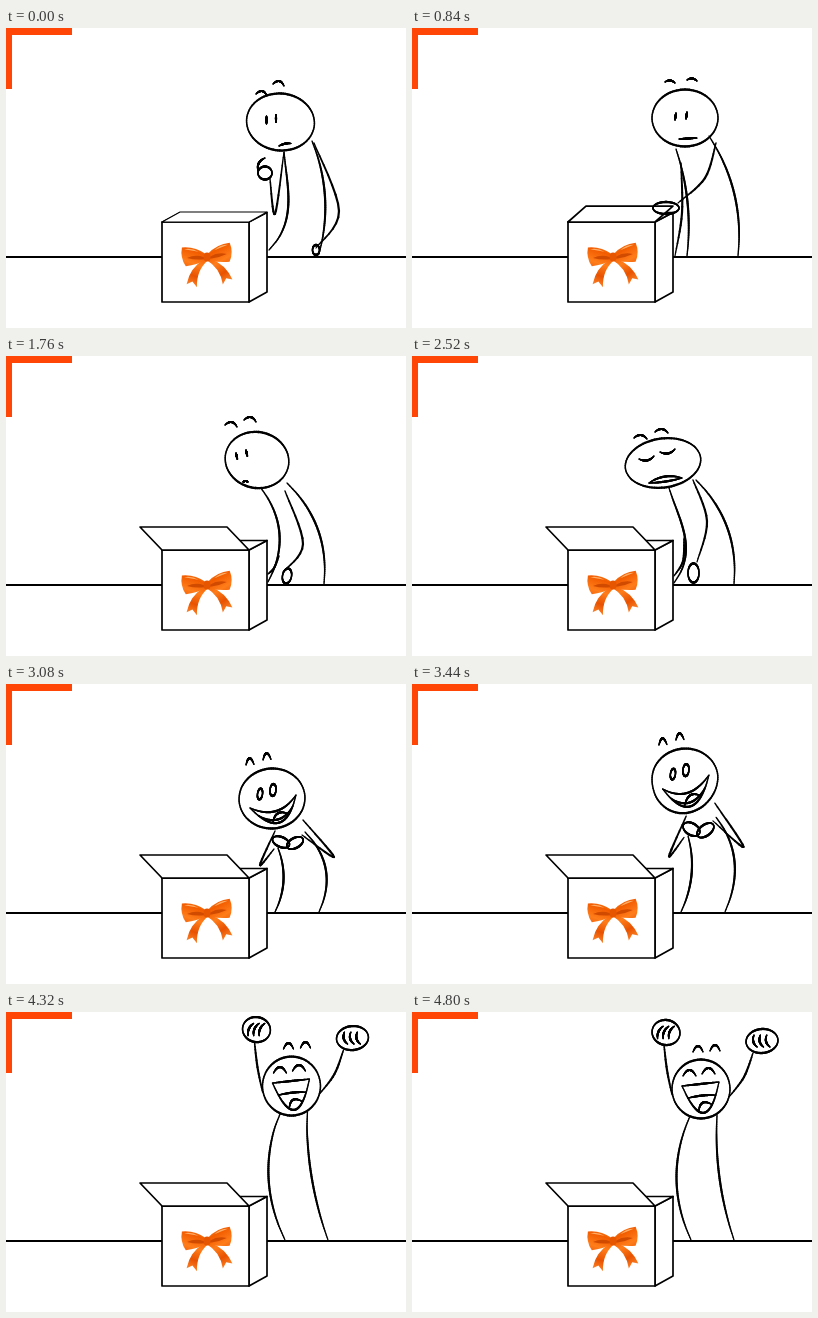
Recreate the animation shown at these times as an HTML page with a canvas. Size 400 by 300 pixels, loop 5.36 s.

```html
<!DOCTYPE html>
<html lang="en">
<head>
<meta charset="utf-8">
<title>Gift box</title>
<style>
  html, body { margin: 0; width: 100%; height: 100%; overflow: hidden; background: #fff; }
  canvas { display: block; width: 400px; height: 300px; }
</style>
</head>
<body>
<canvas id="stage"></canvas>
<script>
const LOOP = 5360, STEP = 40, GROUND = 229;
const { PI, sin, cos, abs, min, max, hypot } = Math;
const canvas = document.getElementById('stage');
const ctx = canvas.getContext('2d');
const dpr = window.devicePixelRatio || 1;
canvas.width = 400 * dpr;
canvas.height = 300 * dpr;

const mix = (a, b, k) => a + (b - a) * k;
const mixPoint = (a, b, k) => [mix(a[0], b[0], k), mix(a[1], b[1], k)];
const steps = n => Array.from({ length: n }, (_, i) => i);

// Stroke builders: each returns a list of strokes
const oval = (cx, cy, rx, ry, tilt = 0) => [{
  closed: true,
  pts: steps(12).map(i => {
    const a = i * PI / 6, x = rx * cos(a), y = ry * sin(a);
    return [cx + x * cos(tilt) - y * sin(tilt), cy + x * sin(tilt) + y * cos(tilt)];
  })
}];

// Line bowed sideways; opposite bends at the two ends give an S
function arc(x0, y0, x1, y1, bend = 0, bendEnd = bend) {
  const dx = x1 - x0, dy = y1 - y0, len = hypot(dx, dy);
  const pts = steps(9).map(i => {
    const u = i / 8, off = 4 * u * (1 - u) * mix(bend, bendEnd, u) / len;
    return [x0 + dx * u - dy * off, y0 + dy * u + dx * off];
  });
  return [{ closed: false, pts }];
}

const limb = (...pts) => [{ closed: false, pts }];
const pair = (x0, y0, x1, y1, dx, dy, bend) =>
  [...arc(x0, y0, x0 + dx, y0 + dy, bend), ...arc(x1, y1, x1 + dx, y1 + dy, bend)];

function grin(x0, y0, x1, y1, lip, jaw, jawEnd = jaw) {
  const chin = arc(x0, y0, x1, y1, jaw, jawEnd);
  const { pts } = chin[0];
  return [...arc(x0, y0, x1, y1, lip), ...arc(...pts[1], ...pts[7], lip - 1),
    ...chin, ...arc(...pts[3], ...pts[6], -6)];
}

const fist = (cx, cy, rx, ry, tilt) => [
  ...oval(cx, cy, rx, ry, tilt),
  ...[-0.4, 0, 0.4].flatMap(k =>
    arc(cx + rx * (k + tilt), cy - ry * 0.5, cx + rx * (k - tilt), cy + ry * 0.5, rx * 0.15))
];

const think = {
  head: oval(274.5, 94, 34, 28.5, 0.1),
  brows: pair(250, 66, 267, 56, 11, 2, -4),
  eyes: pair(260.5, 88, 270, 86.5, 0, 8),
  mouth: arc(273, 118, 285, 115.5, -1),
  front: arc(278, 124, 263, 222, -6, -18),
  back: arc(306, 113, 313, 226, -9.5),
  armL: limb([264, 151], [269, 186], [278, 124]),
  armR: limb([308, 115], [333, 183], [310, 220]),
  handL: [...oval(259, 145, 7, 6.5), ...arc(259, 130, 252, 143, 3)],
  handR: oval(310, 222, 3.5, 5)
};

const reach = {
  head: oval(273, 90, 33, 28.5),
  brows: pair(253, 54, 275, 52, 10, 1, -2),
  eyes: pair(264, 85, 275, 84, -1, 7),
  mouth: arc(267, 111, 285, 110),
  front: arc(264, 121, 275, 228, -6),
  back: arc(297, 108, 326, 228, -11),
  armL: limb([269, 135], [270, 185], [263, 228]),
  armR: limb([304, 115], [293, 150], [266, 175]),
  handR: oval(254, 180, 13, 6)
};

const open = {
  ...reach,
  armR: limb([304, 115], [278, 140], [243, 161]),
  handR: oval(236, 163, 7, 5)
};

const peek = {
  head: oval(251, 104, 32, 28, 0.2),
  brows: pair(219, 69, 238, 64, 12, 2, -4),
  eyes: pair(230, 97, 240, 94, 1.5, 6.5),
  mouth: arc(237, 126, 242, 126, -1),
  front: arc(255, 132, 262, 226, -15),
  back: arc(281, 127, 318, 228, -13),
  armL: limb([273, 200], [268, 212], [262, 218]),
  armR: limb([279, 135], [297, 188], [277, 216]),
  handR: oval(281, 220, 4.5, 7.5, 0.2)
};

const wonder = { ...peek, brows: pair(219, 60, 238, 56, 12, 1, -4) };

const frown = {
  head: oval(251, 107, 38, 24.5, -0.15),
  brows: pair(222, 82, 243, 76, 13, 1, -3.5),
  eyes: pair(227, 103, 248, 96, 15, -3, 3),
  mouth: [...arc(237, 127, 270, 122, -4), ...arc(237, 127, 270, 122, 1)],
  front: arc(257, 132, 262, 227, -6, -20),
  back: arc(284, 124, 322, 228, -13),
  armL: limb([272, 182], [271, 205], [262, 220]),
  armR: limb([281, 124], [295, 165], [285, 206]),
  handR: oval(281.5, 217, 5.5, 9.5)
};

const { head, brows, eyes, mouth } = frown;
const sigh = { ...peek, head, brows, eyes, mouth };

const delight = {
  head: oval(266, 114.5, 33, 30, -0.1),
  brows: pair(240, 81, 257, 76, 8, -0.5, -6.5),
  eyes: [...oval(254, 110, 2.5, 5.3, 0.15), ...oval(267, 106, 3, 6, 0.1)],
  mouth: grin(244, 124, 290, 111, 10, 22),
  front: arc(272, 164, 269, 228, -7),
  back: arc(299, 148, 313, 228, -14),
  armL: limb([269, 147], [254, 181], [268, 165]),
  armR: limb([297, 136], [328, 173], [296, 151]),
  handL: oval(275, 158, 9, 5, 0.4),
  handR: oval(289, 159, 9, 5, -0.5)
};

const shout = {
  head: oval(275, 87, 29.5, 36, 0.25),
  eyes: pair(277, 65, 290, 63, -5.5, 12.5),
  mouth: grin(253, 92, 289, 86, 4, 34, 20),
  front: arc(252, 122, 268, 228, 4, -7),
  back: arc(288, 118, 316, 228, 3, -6),
  armL: limb([229, 96], [238, 123], [250, 120]),
  armR: limb([316, 97], [321, 133], [289, 118]),
  handL: fist(232.5, 79, 14, 18, 0.25),
  handR: fist(312, 81, 12, 16.5, 0.2)
};

const cheer = {
  head: oval(289, 77, 29, 29.5),
  brows: pair(281, 40, 298, 39, 10, 0, -6),
  eyes: pair(271, 64, 290, 62, 13, 0, -6),
  mouth: grin(270, 74, 307, 70, 0, 29),
  front: arc(278, 104, 279, 228, 14),
  back: arc(305, 103, 322, 228, 6),
  armL: limb([252, 33], [255, 58], [260, 83]),
  armR: limb([341, 41], [332, 65], [317, 85]),
  handL: fist(254, 20.5, 14, 12.5, 0.2),
  handR: fist(350, 29, 16, 12, -0.1)
};

const poseKeys = [
  [0, think], [400, think], [840, reach], [960, open], [1000, open],
  [1200, think], [1440, think], [1760, peek], [2160, peek],
  [2240, wonder], [2320, sigh], [2480, sigh], [2520, frown],
  [2760, delight], [3640, delight], [3800, shout], [4000, cheer], [LOOP, cheer]
];

// Bounces laid over the poses: start, end, sideways, upwards, beats
const bounces = [
  [2520, 3040, -3, -54, 1], [3120, 3600, 8, -23, 1],
  [3800, 4200, 5, -8, 1], [4200, 4800, -6, -5, 4]
];

// Opening angle of the lid
const lidKeys = [[0, 0], [760, 0], [840, 0.4], [960, 2.2], [1000, 2.2], [1040, PI], [LOOP, PI]];

function span(keys, t) {
  const i = keys.findIndex(key => key[0] > t);
  const [t0, from] = keys[i - 1], [t1, to] = keys[i];
  const u = (t - t0) / (t1 - t0);
  return [from, to, u * u * (3 - 2 * u)];
}

const alike = (a, b) => a && b && a.length === b.length &&
  a.every((s, i) => s.pts.length === b[i].pts.length);

function mixStrokes(a, b, k) {
  if (!alike(a, b)) return (k < 0.5 ? a : b) || [];
  return a.map(({ closed, pts }, i) =>
    ({ closed, pts: pts.map((p, j) => mixPoint(p, b[i].pts[j], k)) }));
}

function bounceAt(t) {
  const hit = bounces.find(([t0, t1]) => t >= t0 && t < t1);
  if (!hit) return [0, 0];
  const [t0, t1, dx, dy, beats] = hit;
  const swing = sin(PI * beats * (t - t0) / (t1 - t0));
  return [dx * swing, dy * abs(swing)];
}

const curve = (a, b, c, d, u) => 0.5 * (2 * b + (c - a) * u +
  (2 * a - 5 * b + 4 * c - d) * u * u + (3 * b - a - 3 * c + d) * u * u * u);

// Smooth curve through the points, drawn with a brush of changing width
function brush({ pts, closed }) {
  const n = pts.length, pieces = closed ? n : n - 1, sub = 8;
  const at = i => closed ? pts[(i + n) % n] : pts[max(0, min(n - 1, i))];
  let last = pts[0];
  for (let i = 0; i < pieces; i++) {
    const q = [at(i - 1), at(i), at(i + 1), at(i + 2)];
    for (let s = 1; s <= sub; s++) {
      const u = (i + s / sub) / pieces;
      const next = [0, 1].map(d => curve(...q.map(p => p[d]), s / sub));
      ctx.lineWidth = closed ? 1.9 - 0.4 * cos(4 * PI * u) : 1.2 + sin(PI * u);
      ctx.beginPath();
      ctx.moveTo(...last);
      ctx.lineTo(...next);
      ctx.stroke();
      last = next;
    }
  }
}

function panel(...points) {
  ctx.beginPath();
  points.forEach(p => ctx.lineTo(...p));
  ctx.closePath();
  ctx.fill();
  ctx.stroke();
}

function drawBox(angle) {
  const left = [156, 194], right = [243, 194], rear = [261, 184.5];
  const x = 154 + 20 * cos(angle) + 4 * sin(angle);
  const y = 184 - 6.5 * (1 - cos(angle)) - 14 * sin(angle);
  ctx.fillStyle = '#fff';
  ctx.lineWidth = 1.7;
  panel(right, rear, [261, 264], [243, 274]);
  panel(left, right, [243, 274], [156, 274]);
  ctx.lineWidth = angle ? 1.7 : 1.1;
  panel(left, [174, 184.5], rear, right);
  panel(left, [x, y], [x + 87, y], right);
}

const ribbon = ctx.createLinearGradient(0, -14, 20, 28);
['#ff9a3c', '#f25c00', '#ff7d1a', '#e85200', '#ff8a2c']
  .forEach((color, i, all) => ribbon.addColorStop(i / (all.length - 1), color));
const halfBow = [
  [ribbon, 'M-1 3Q12 12 13 29L17 23L23 25Q18 9 3 2Z'],
  [ribbon, 'M1-3Q11-12 24-12Q27-2 22 7Q11 7 1 3Z'],
  ['#d04a00', 'M3 0Q11-4 20-1Q12 2 3 2Z'],
  ['#ffae66', 'M8-6Q15-11 22-10Q15-8 8-6Z']
].map(([color, d]) => [color, new Path2D(d)]);

function drawBow() {
  for (const side of [-1, 1]) {
    ctx.save();
    ctx.translate(201, 229);
    ctx.rotate(-0.1);
    ctx.scale(side, 1);
    for (const [color, path] of halfBow) {
      ctx.fillStyle = color;
      ctx.fill(path);
    }
    ctx.restore();
  }
  ctx.fillStyle = '#e65600';
  ctx.beginPath();
  ctx.ellipse(201, 229, 3.5, 4.5, 0, 0, 2 * PI);
  ctx.fill();
}

function drawFigure(t) {
  const [from, to, k] = span(poseKeys, t);
  const [dx, dy] = bounceAt(t);
  // The feet stay put while the rest follows the bounce
  const pull = ([x, y]) => {
    const grip = max(0, min(1, (GROUND - y) / 110));
    return [x + dx * grip, y + dy * grip];
  };
  for (const name of new Set([...Object.keys(from), ...Object.keys(to)])) {
    for (const { closed, pts } of mixStrokes(from[name], to[name], k)) {
      brush({ closed, pts: pts.map(pull) });
    }
  }
}

function draw(now) {
  const t = Math.floor(now % LOOP / STEP) * STEP;
  ctx.setTransform(dpr, 0, 0, dpr, 0, 0);
  ctx.fillStyle = '#fff';
  ctx.fillRect(0, 0, 400, 300);

  ctx.fillStyle = '#ff4606';
  ctx.fillRect(0, 0, 66, 7);
  ctx.fillRect(0, 0, 6, 61);

  ctx.fillStyle = ctx.strokeStyle = '#000';
  ctx.lineCap = ctx.lineJoin = 'round';
  ctx.fillRect(0, GROUND - 1, 400, 2);

  const [shut, ajar, k] = span(lidKeys, t);
  drawBox(mix(shut, ajar, k));
  drawBow();
  drawFigure(t);
}

const start = performance.now();
function tick() {
  draw(performance.now() - start);
  requestAnimationFrame(tick);
}
tick();
</script>
</body>
</html>
```
